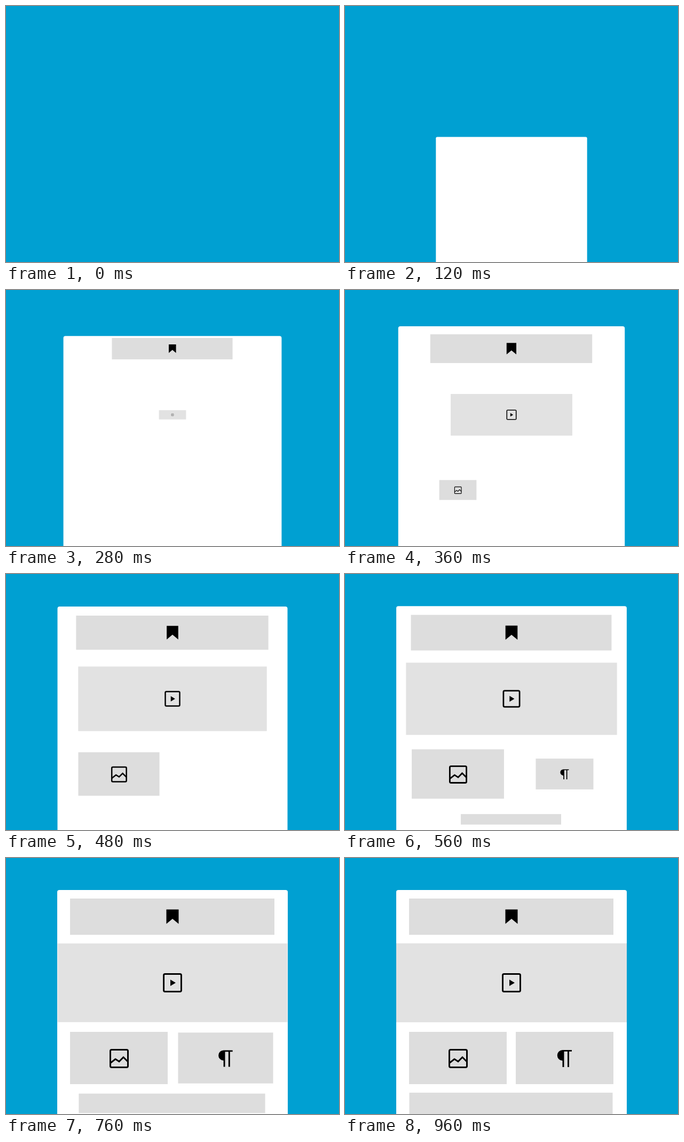
An HTML page for the animation above (1.04 s loop, 624 by 480 pixels).

```html
<!DOCTYPE html>
<html lang="en">
<head>
<meta charset="utf-8">
<title>Page layout building up</title>
<style>
  html, body { margin: 0; width: 100%; height: 100%; overflow: hidden; background: #00a0d2; }
  svg { display: block; width: 624px; height: 480px; }
  .line { fill: none; stroke: #000; stroke-width: 3; }
</style>
</head>
<body>
<svg viewBox="0 0 624 480">
  <rect id="page" fill="#fff"/>
  <g id="banner">
    <rect x="-191.5" y="-34" width="383" height="68" fill="#ddd"/>
    <path d="M-11 -13.5H12V13.5L.5 4L-11 13.5Z"/>
  </g>
  <g id="video">
    <rect x="-216" y="-74" width="432" height="148" fill="#e2e2e2"/>
    <rect class="line" x="-16.5" y="-16.5" width="33" height="33" rx="2.5"/>
    <path d="M-4 -6L6 0L-4 6Z"/>
  </g>
  <g id="image">
    <rect x="-91.5" y="-49" width="183" height="98" fill="#ddd"/>
    <g class="line" transform="translate(.5 1)">
      <rect x="-16.5" y="-16.5" width="33" height="33" rx="2.5"/>
      <path d="M-16.5 8.5L-7 1L0 5.5L8 -2.5L16.5 6"/>
    </g>
  </g>
  <g id="text">
    <rect x="-91.5" y="-49" width="183" height="98" fill="#ddd"/>
    <path d="M13.5 -15H-3.5A10 10 0 0 0 -4 5V17H-1V-12.2H5.5V17H8.5V-12.2H13.5Z"/>
  </g>
  <g id="footer">
    <rect x="-191" y="-20" width="382" height="40" fill="#ddd"/>
  </g>
</svg>
<script>
const LOOP = 1040, STEP = 40, LAST = 960;
const $ = id => document.getElementById(id);

const blocks = [
  { id: "banner", x: 311.5, y: 110, start: 177, length: 562 },
  { id: "video", x: 312, y: 234, start: 269, length: 600 },
  { id: "image", x: 211.5, y: 375, start: 320, length: 437 },
  { id: "text", x: 411.5, y: 375, start: 480, length: 437 },
  { id: "footer", x: 311, y: 460, start: 482, length: 575 }
];

const phase = (t, start, length) => Math.min(1, Math.max(0, (t - start) / length));
const easeOut = (p, power) => 1 - (1 - p) ** power;
const pop = p => easeOut(p ** 0.8, 3);

function setAttrs(el, attrs) {
  for (const key in attrs) el.setAttribute(key, attrs[key]);
}

function draw(t) {
  const p = phase(t, 10, 881);
  const scale = easeOut(p, 8);
  setAttrs($("page"), {
    x: 312 - 216 * scale,
    y: 629 - 569 * easeOut(p, 8.4),
    width: 432 * scale,
    height: 700,
    rx: 4 * scale
  });
  for (const { id, x, y, start, length } of blocks) {
    const s = pop(phase(t, start, length));
    setAttrs($(id), {
      transform: `translate(${x} ${y}) scale(${s})`,
      visibility: s > 0 ? "visible" : "hidden"
    });
  }
}

const begin = performance.now();
function tick() {
  const t = Math.max(0, performance.now() - begin) % LOOP;
  draw(Math.min(LAST, Math.floor(t / STEP) * STEP));
  requestAnimationFrame(tick);
}
tick();
</script>
</body>
</html>
```
